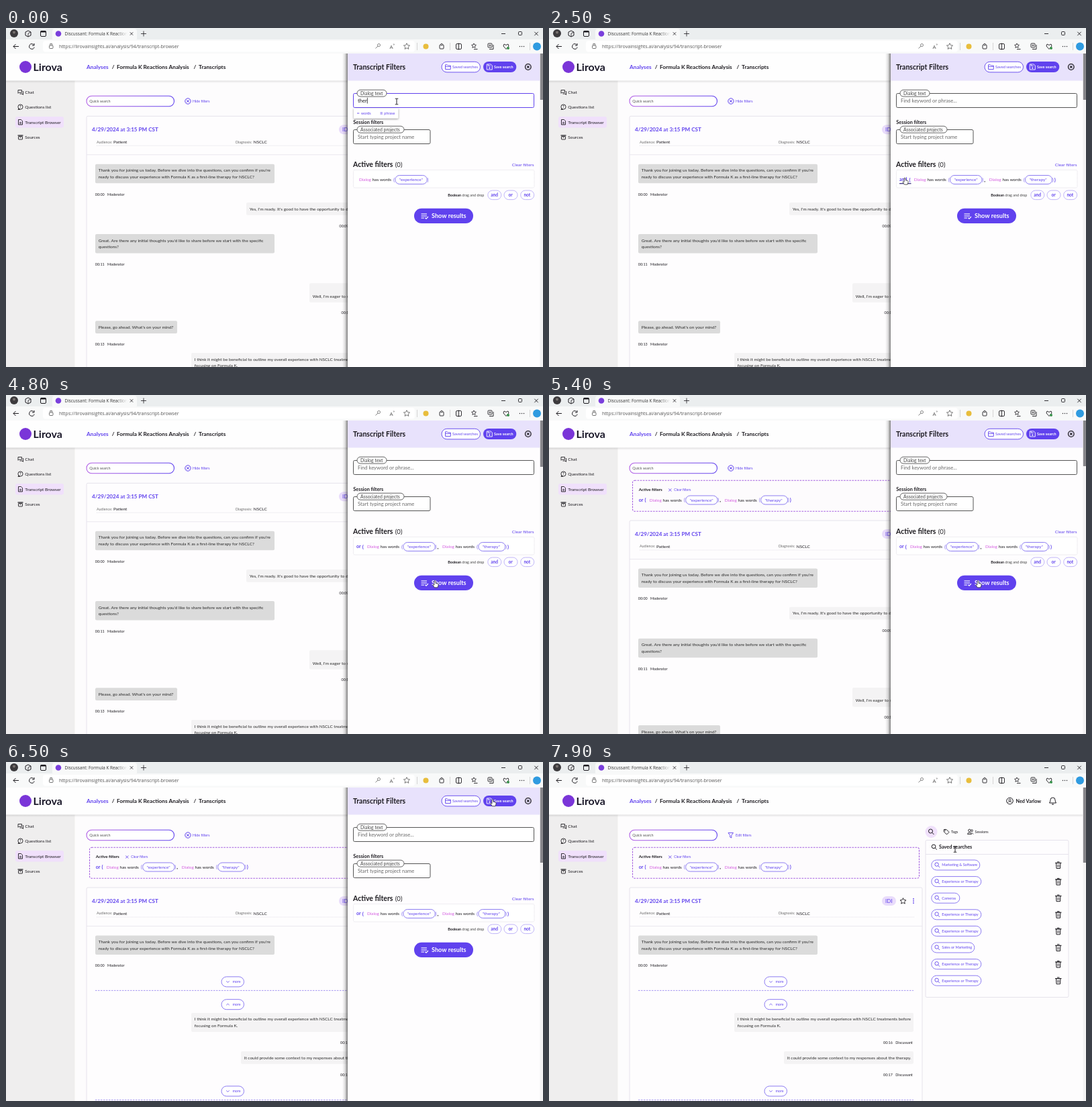
Animation of 800x505 px, one loop 8 s. Source, as an HTML page with a canvas:

```html
<!DOCTYPE html>
<html lang="en">
<head>
<meta charset="utf-8">
<title>Transcript filters</title>
<style>
html, body { margin: 0; width: 100%; height: 100%; overflow: hidden; background: #fdfcfd; }
canvas { display: block; width: 800px; height: 505px; }
</style>
</head>
<body>
<canvas id="stage"></canvas>
<script>
const W = 800, H = 505, LOOP = 8000;
const cv = document.getElementById('stage'), c = cv.getContext('2d');
const dpr = window.devicePixelRatio || 1;
cv.width = W * dpr;
cv.height = H * dpr;

const INK = '#1d1b20', VIO = '#6042ee', PINK = '#d45ee0', GREY = '#6a6a6a', LAV = '#e8e2fc', PALE = '#f0e0fb';
const UI = 'Lato, "Open Sans", sans-serif', SYS = '"Open Sans", "Noto Sans", sans-serif';

// ---------- helpers ----------
const clamp = v => Math.max(0, Math.min(1, v));
const span = (t, a, b) => clamp((t - a) / (b - a));
const ease = p => p * p * (3 - 2 * p);

// y is the vertical middle of the capitals
function txt(s, x, y, size, col = INK, weight = 400, font = UI) {
  c.font = `${weight} ${size}px ${font}`;
  c.fillStyle = col;
  c.fillText(s, x, y + size * 0.35);
}
function paint(fill, stroke, lw = 1) {
  if (fill) { c.fillStyle = fill; c.fill(); }
  if (stroke) { c.strokeStyle = stroke; c.lineWidth = lw; c.stroke(); }
}
function box(x, y, w, h, r, fill, stroke, lw) {
  c.beginPath();
  c.roundRect(x, y, w, h, r);
  paint(fill, stroke, lw);
}
function circ(x, y, r, fill, stroke, lw) {
  c.beginPath();
  c.arc(x, y, r, 0, 7);
  paint(fill, stroke, lw);
}
function poly(pts, fill, stroke, lw, close) {
  c.beginPath();
  for (let i = 0; i < pts.length; i += 2) c.lineTo(pts[i], pts[i + 1]);
  if (close) c.closePath();
  paint(fill, stroke, lw);
}
const line = (col, lw, ...pts) => poly(pts, null, col, lw);
function dashed(pattern, draw) {
  c.setLineDash(pattern);
  draw();
  c.setLineDash([]);
}
function cross(x, y, r, col, lw) {
  line(col, lw, x - r, y - r, x + r, y + r);
  line(col, lw, x + r, y - r, x - r, y + r);
}
function star(x, y, r, col, lw) {
  const pts = [];
  for (let i = 0; i < 10; i++) {
    const a = i * Math.PI / 5 - Math.PI / 2, q = i % 2 ? r * 0.48 : r;
    pts.push(x + q * Math.cos(a), y + q * Math.sin(a));
  }
  poly(pts, null, col, lw, true);
}
function lens(x, y, r, col, lw) {
  circ(x - r * 0.25, y - r * 0.25, r * 0.75, null, col, lw);
  line(col, lw, x + r * 0.3, y + r * 0.3, x + r, y + r);
}
function disk(x, y, col) {
  poly([x - 4, y - 4, x + 2, y - 4, x + 4, y - 2, x + 4, y + 4, x - 4, y + 4], null, col, 0.9, true);
  line(col, 0.9, x - 2, y - 4, x - 2, y - 1.5, x + 1.5, y - 1.5);
  circ(x, y + 1.6, 1.1, col);
}

// ---------- browser frame ----------
function browser() {
  c.fillStyle = '#ebeeef';
  c.fillRect(0, 0, W, 18);
  c.fillStyle = '#f8f9f9';
  c.fillRect(0, 17, W, 21);
  box(69, 1, 126, 19, 4, '#f8f9f9');
  circ(12, 8, 6, '#3c3a3d');
  circ(12, 6.5, 2, '#77716f');
  poly([29, 6, 33, 4, 37, 6, 37, 11, 33, 13, 29, 11], null, INK, 1, true);
  line(INK, 0.8, 33, 13, 33, 8, 37, 6);
  box(51.5, 4.5, 8, 8, 1.5, null, INK, 1);
  line(INK, 2, 51.5, 5.5, 59.5, 5.5);
  circ(78, 8.5, 4.3, '#7a3fdc');
  const fade = c.createLinearGradient(165, 0, 181, 0);
  fade.addColorStop(0, '#333');
  fade.addColorStop(1, 'rgba(60,60,60,0)');
  txt('Discussant: Formula K Reactions', 87.5, 8.7, 6.4, fade, 400, SYS);
  cross(187, 8.5, 2.2, INK, 0.8);
  line(INK, 0.8, 201, 8.5, 209, 8.5);
  line(INK, 0.8, 205, 4.5, 205, 12.5);
  line(INK, 0.9, 738, 8.5, 744, 8.5);
  box(763.5, 5.5, 5, 5, 1, null, INK, 0.9);
  cross(790, 8.5, 2.7, INK, 0.9);

  line(INK, 1, 19, 27.5, 11, 27.5);
  line(INK, 1, 14.5, 24, 11, 27.5, 14.5, 31);
  c.beginPath();
  c.arc(38.5, 27.5, 3.8, 0.3, 5.6);
  paint(null, INK, 1);
  line(INK, 1, 42, 23, 42, 26, 39, 26);
  box(55, 19, 554, 16.5, 4, '#fff');
  box(64.5, 26, 5.5, 4.5, 1, null, '#555', 0.8);
  line('#555', 0.8, 65.8, 26, 65.8, 23.5, 68.6, 23.5, 68.6, 26);
  txt('https://lirovainsights.ai/analysis/94/transcript-browser', 79, 27.3, 7.1, '#555', 400, SYS);

  circ(555.5, 25.5, 2, null, '#666', 0.8);
  line('#666', 0.8, 554, 27, 550.5, 30.5);
  txt('A', 571.5, 28, 8, '#555', 400, SYS);
  txt('»', 576.5, 24.5, 5, '#555', 400, SYS);
  star(597, 27.5, 4.8, '#555', 0.8);
  line('#ccc', 0.8, 612.5, 22, 612.5, 33);
  circ(625.5, 27.5, 4, '#e8bd3c');
  box(646, 25, 6, 6, 1, null, INK, 0.9);
  circ(649, 24.5, 1.3, '#f8f9f9', INK, 0.8);
  line('#ccc', 0.8, 661.5, 22, 661.5, 33);
  box(670.5, 23.5, 8, 8, 1.5, null, INK, 0.9);
  line(INK, 0.9, 674.5, 22.5, 674.5, 32.5);
  star(697, 26.5, 3.6, INK, 0.8);
  line(INK, 0.9, 697, 31.5, 702.5, 31.5);
  box(718, 23, 6, 6, 1, null, INK, 0.9);
  line(INK, 0.9, 720, 31.5, 726, 31.5, 726, 25);
  line(INK, 0.8, 721, 24.5, 721, 27.5);
  line(INK, 0.8, 719.5, 26, 722.5, 26);
  line(INK, 0.9, 745, 31.5, 741, 27, 742, 24, 745, 25.5, 748, 24, 749, 27, 745, 31.5);
  circ(748, 30, 2, '#39934c');
  for (const x of [765.5, 768.5, 771.5]) circ(x, 27.5, 0.7, INK);
  line('#ccc', 0.8, 780.5, 22, 780.5, 33);
  circ(791, 27.5, 6, '#2f9be0');
}

// ---------- page ----------
function sidebar() {
  c.fillStyle = '#efeeee';
  c.fillRect(0, 78, 102.5, H);
  box(14, 132, 72, 16.5, 3, PALE);
  txt('Chat', 28.3, 95.5, 6.5);
  txt('Questions list', 28.3, 118, 6.5);
  txt('Transcript Browser', 28.3, 140.5, 6.5);
  txt('Sources', 28.3, 162.8, 6.5);
  line(INK, 0.9, 18, 97, 18, 92.5, 23.5, 92.5, 23.5, 96, 19.5, 96, 18, 97.5);
  line(INK, 0.9, 20.5, 98, 24, 98, 25.5, 99.5, 25.5, 94);
  circ(21.5, 117.5, 3.6, null, INK, 0.9);
  line(INK, 0.9, 19, 120, 18, 121.5, 21, 121.2);
  txt('?', 20.2, 117.5, 5, INK, 700);
  poly([18.5, 136.5, 22.5, 136.5, 24.5, 138.5, 24.5, 144, 18.5, 144], null, INK, 0.9, true);
  line(INK, 0.8, 20, 140.5, 23, 140.5);
  line(INK, 0.8, 20, 142.3, 23, 142.3);
  box(18.5, 161.5, 6, 4.5, 0.5, null, INK, 0.9);
  line(INK, 1.2, 17.5, 160, 25.5, 160);
  line(INK, 0.8, 20.3, 163, 22.7, 163);
}

function header() {
  const g = c.createLinearGradient(0, 78, 0, 82);
  g.addColorStop(0, 'rgba(0,0,0,.13)');
  g.addColorStop(1, 'rgba(0,0,0,0)');
  c.fillStyle = g;
  c.fillRect(0, 78, 795, 4);
  c.fillStyle = '#fefefe';
  c.fillRect(0, 38, 795, 40.5);
  circ(29, 58, 9, '#7a35d8');
  txt('Lirova', 40.5, 58, 16, '#1c1a2b', 700);
  txt('Analyses', 120, 58, 8.3, VIO, 700);
  txt('/', 157.7, 58, 8.3, INK, 700);
  txt('Formula K Reactions Analysis', 165, 58, 8.25, INK, 700);
  txt('/', 279.5, 58, 8.3, INK, 700);
  txt('Transcripts', 287, 58, 8.3, INK, 700);
  circ(686.5, 58, 4.8, null, INK, 1);
  circ(686.5, 56.7, 1.6, null, INK, 0.9);
  c.beginPath();
  c.arc(686.5, 62, 3.2, 3.6, 5.8);
  paint(null, INK, 0.9);
  txt('Ned Varlow', 695.5, 58, 7.2, INK, 700);
  c.beginPath();
  c.moveTo(745.5, 61);
  c.quadraticCurveTo(747, 59, 747, 56.5);
  c.arc(750.5, 56.5, 3.5, Math.PI, 0);
  c.quadraticCurveTo(754, 59, 755.5, 61);
  c.closePath();
  paint(null, INK, 1);
  line(INK, 1.1, 749, 63, 752, 63);
}

function term(d, y, word, w) {
  txt('Dialog', d, y, 6.4, PINK);
  txt('has words', d + 19.8, y, 6.4);
  txt('(', d + 51, y, 8, '#8d7cf0');
  box(d + 53.8, y - 6.5, w, 13, 6.5, '#fff', '#8270f0', 0.9);
  txt(`"${word}"`, d + 59.7, y, 6.4, VIO);
  txt(')', d + 54 + w, y, 8, '#8d7cf0');
}
function expr(op, x, y) {
  if (!op) return term(x + 4, y, 'experience', 47.5);
  const d = x + (op === 'and' ? 21.7 : 16);
  txt(op, x, y, 7, VIO, 700);
  txt('(', d - 7.3, y, 7.5, VIO, 700);
  term(d, y, 'experience', 47.5);
  txt(',', d + 104.5, y, 7.5, INK, 700);
  term(d + 112, y, 'therapy', 40);
  txt(')', d + 209, y, 7.5, VIO, 700);
}

function message(x, y, w, dark, lines) {
  box(x, y, w, 9 + 9.7 * lines.length, 2, dark ? '#dbdbdb' : '#f4f3f4');
  lines.forEach((s, i) => txt(s, x + 4.7, y + 9.3 + i * 9.8, 6.45, '#2c2c2c'));
}
function meta(time, who, x, y) {
  txt(time, x, y, 5.4);
  txt(who, x + 18.3, y, 5.4);
}
function more(y, up) {
  box(321, y - 7.5, 33.5, 15, 7.5, '#fff', '#7f6cf0', 0.9);
  const k = up ? -1 : 1;
  line(VIO, 0.8, 328.3, y - k, 330.5, y + k, 332.7, y - k);
  txt('more', 337.5, y, 5.3, VIO);
}
function gap(y) {
  more(y);
  dashed([2.5, 1.5], () => line('#9b8df0', 0.9, 133, y + 13, 543, y + 13));
  more(y + 33.8, true);
}

const OPENER = ["Thank you for joining us today. Before we dive into the questions, can you confirm if you're",
  'ready to discuss your experience with Formula K as a first-line therapy for NSCLC?'];
const OUTLINE = ['I think it might be beneficial to outline my overall experience with NSCLC treatments before',
  'focusing on Formula K.'];

function transcript(top, found, grow) {
  box(120, top, 436, 420, 2, '#fefdfe', '#e6e3ec', 1);
  txt('4/29/2024 at 3:15 PM CST', 128, top + 20, 8.1, VIO, 700);
  box(496, top + 13, 21, 14, 7, '#e9dcfb');
  txt('IDI', 501, top + 20, 8.2, VIO);
  star(527.5, top + 20.3, 4.7, INK, 0.9);
  for (const dy of [17, 20, 23]) circ(543, top + dy, 0.9, VIO);
  txt('Audience:', 135, top + 38.5, 5.3, GREY);
  txt('Patient', 160, top + 38.5, 6.5);
  txt('Diagnosis:', 342, top + 38.5, 5.4, GREY);
  txt('NSCLC', 368.5, top + 38.5, 6.5);
  dashed([1, 1], () => line('#dedbe3', 0.8, 135, top + 44, 545, top + 44));
  line('#e9e6ee', 0.9, 120, top + 57.5, 556, top + 57.5);

  message(133, top + 71.5, 267, true, OPENER);
  meta('00:00', 'Moderator', 132.8, top + 116.5);
  if (!found) {
    message(358, top + 128.7, 185, false, ["Yes, I'm ready. It's good to have the opportunity to discuss it."]);
    meta('00:09', 'Discussant', 496.5, top + 164);
    message(133, top + 175.8, 267, true, ["Great. Are there any initial thoughts you'd like to share before we start with the specific", 'questions?']);
    meta('00:11', 'Moderator', 132.8, top + 221);
    message(452, top + 249, 91, false, ['', "Well, I'm eager to share."]);
    meta('00:12', 'Discussant', 499.5, top + 293);
    message(133, top + 305, 122, true, ["Please, go ahead. What's on your mind?"]);
    meta('00:13', 'Moderator', 132.8, top + 340);
    message(276, top + 352.7, 267, false, OUTLINE);
    return;
  }
  const k = grow * 8.4;
  gap(top + 132 + k);
  message(276, top + 178.3 + k, 267, false, OUTLINE);
  meta('00:16', 'Discussant', 498, top + 223 + k);
  message(350, top + 227.2 + 2 * k, 193, false, ['It could provide some context to my responses about the therapy.']);
  meta('00:17', 'Discussant', 498, top + 262.2 + 2 * k);
  gap(top + 279 + 2.9 * k);
}

const SAVED = [['Marketing & Software', 72], ['Experience or Therapy', 74], ['Cameras', 42],
  ['Experience or Therapy', 74], ['Experience or Therapy', 74], ['Sales or Marketing', 64],
  ['Experience or Therapy', 74], ['Experience or Therapy', 74]];

function savedList() {
  circ(569.5, 104, 9, PALE);
  lens(569.5, 104, 4, INK, 1);
  poly([588.5, 100.5, 592, 100.5, 596, 104.5, 592.5, 108, 588.5, 104], null, INK, 1, true);
  circ(590.3, 102.3, 0.7, INK);
  txt('Tags', 599, 104, 5.4);
  circ(626.5, 102, 1.8, null, INK, 0.9);
  circ(630, 102.2, 1.4, null, INK, 0.8);
  line(INK, 0.9, 623.5, 107.5, 624.5, 105.3, 628.5, 105.3, 629.5, 107.5, 623.5, 107.5);
  line(INK, 0.9, 630, 105.3, 632, 107.5);
  txt('Sessions', 634.5, 104, 5.4);
  box(561, 116.5, 213, 234, 2, '#fefdfe', '#e6e3ec', 1);
  lens(574, 126.8, 3.8, INK, 1);
  txt('Saved searches', 581, 126.8, 7.3, INK, 700);
  line('#e6e3ec', 1, 561, 137.5, 774, 137.5);
  SAVED.forEach(([name, w], i) => {
    const y = 153.5 + i * 24.6;
    box(569.8, y - 7.5, w, 15, 7.5, '#fff', '#7f6cf0', 0.9);
    lens(578.5, y, 3.6, VIO, 0.9);
    txt(name, 585.3, y, 5.5, VIO);
    poly([755.5, y - 3, 762, y - 3, 761.5, y + 5, 756, y + 5], null, INK, 1, true);
    line(INK, 1, 754, y - 3.2, 763.5, y - 3.2);
    line(INK, 1, 757, y - 4.7, 760.5, y - 4.7);
    line(INK, 0.8, 757.8, y - 1, 757.8, y + 3.2);
    line(INK, 0.8, 759.8, y - 1, 759.8, y + 3.2);
  });
}

function main(s) {
  const g = c.createLinearGradient(120, 101, 250, 117);
  g.addColorStop(0, '#b25fe6');
  g.addColorStop(0.5, '#8a4fe6');
  g.addColorStop(1, VIO);
  box(120, 101.2, 130.5, 15.6, 7.8, '#fff', g, 1.1);
  txt('Quick search', 124.3, 109.3, 5.5, '#555');
  if (s.closing) {
    poly([267, 105.5, 274.5, 105.5, 271.8, 109.3, 271.8, 113, 269.7, 112, 269.7, 109.3], null, VIO, 0.9, true);
    txt('Edit filters', 278, 109, 5.3, VIO);
  } else {
    circ(271, 109, 4.2, null, VIO, 1);
    cross(271, 109, 1.8, VIO, 1);
    txt('Hide filters', 278, 109, 5.3, VIO);
  }
  if (s.applied) {
    dashed([2.6, 1.5], () => box(124.5, 127.3, 427, 46, 3, '#fdfbfd', '#a45fe0', 1.1));
    txt('Active filters', 133.8, 141.3, 6.2, INK, 700);
    cross(180.3, 141.5, 2, VIO, 0.9);
    txt('Clear filters', 186.3, 141.5, 5, VIO);
    expr('or', 133.8, 156.5);
  }
  transcript(s.applied ? 187 : 131.3, s.found, s.grow);
}

// ---------- filter drawer ----------
function drawer(s) {
  const g = c.createLinearGradient(501, 0, 509, 0);
  g.addColorStop(0, 'rgba(30,30,30,0)');
  g.addColorStop(0.5, 'rgba(30,30,30,.14)');
  g.addColorStop(1, 'rgba(30,30,30,.56)');
  c.fillStyle = g;
  c.fillRect(501, 38, 8, H);
  c.fillStyle = '#fefdfe';
  c.fillRect(509, 38, 286.5, H);
  c.fillStyle = LAV;
  c.fillRect(509, 38, 286.5, 40.5);
  txt('Transcript Filters', 517, 58.3, 10.5, INK, 700);
  box(649, 50.3, 57.5, 15.6, 7.8, '#fff', VIO, 0.9);
  poly([654.5, 54.8, 657.3, 54.8, 658.5, 56, 662.3, 56, 662.3, 61.5, 654.5, 61.5], null, VIO, 0.9, true);
  line(VIO, 0.8, 654.5, 57.6, 662.3, 57.6);
  txt('Saved searches', 665, 58.2, 5.7, VIO);
  box(711, 50, 49.3, 16, 8, VIO);
  disk(720.3, 58, '#fff');
  txt('Save search', 727, 58.2, 5.5, '#fff', 700);
  circ(777.8, 58, 4.3, null, INK, 1.3);
  cross(777.8, 58, 1.7, INK, 1.2);

  box(517.5, 97.5, 269, 21, 2, '#fff', s.typed ? VIO : '#555', 1);
  box(523, 92.2, 44, 10, 5, '#fff', '#555', 0.9);
  txt('Dialog text', 528, 97.3, 7, '#444');
  if (s.typed) {
    txt(s.typed, 524, 108.3, 7.6);
    const end = 524.6 + c.measureText(s.typed).width;
    line(INK, 0.8, end, 103.8, end, 112.5);
  } else txt('Find keyword or phrase...', 524, 108.3, 7.6, GREY);

  txt('Session filters', 517.3, 140, 7.3, INK, 700);
  box(517.5, 151.5, 114.5, 21, 2, '#fff', '#555', 1);
  box(523, 146.2, 70, 10, 5, '#fff', '#555', 0.9);
  txt('Associated projects', 528, 151.3, 6.9, '#444');
  txt('Start typing project name', 524, 162.5, 7.6, GREY);

  txt('Active filters', 517, 203.5, 10.5, INK, 700);
  txt('(0)', 579.8, 203.5, 9.6);
  txt('Clear filters', 753.8, 203.5, 6.5, VIO);
  dashed([1, 1], () => box(517.5, 211.5, 269.5, 26.5, 2, '#fff', '#dddae2', 0.9));
  expr(s.op, 522, 226);
  if (s.hover) line('#2d2478', 1.2, 522, 231.7, 539.5, 231.7);

  txt('Boolean', 658.3, 248.7, 5.4, INK, 700);
  txt('drag and drop', 679.5, 248.7, 5.4, '#444');
  [['and', 717.8, 4.4], ['or', 742, 6.5], ['not', 766.7, 4.7]].forEach(([w, x, dx]) => {
    box(x, 242, 20, 13.6, 6.8, '#fff', '#b9adf8', 0.9);
    txt(w, x + dx, 248.7, 6.6, VIO, 700);
  });
  box(608, 268.7, 88, 22.3, 11.1, VIO);
  line('#fff', 1.1, 618.5, 277, 627, 277);
  line('#fff', 1.1, 618.5, 280, 627, 280);
  line('#fff', 1.1, 618.5, 283, 623, 283);
  line('#fff', 1.1, 624.3, 282.5, 626, 284.2, 629, 281);
  txt('Show results', 634, 280, 9.1, '#fff', 700);

  if (s.typed) {
    c.save();
    c.shadowColor = 'rgba(0,0,0,.4)';
    c.shadowBlur = 3 * dpr;
    c.shadowOffsetY = dpr;
    box(518, 119.5, 66.5, 15.3, 1, '#fff');
    c.restore();
    line(VIO, 0.9, 523, 127, 526.3, 127);
    txt('words', 529, 127, 5.5, VIO);
    line(VIO, 0.8, 557.5, 126, 561, 126);
    line(VIO, 0.8, 557.5, 128, 561, 128);
    txt('phrase', 563.3, 127, 5.5, VIO);
  }
}

function scrollbar(end) {
  c.fillStyle = '#f3f2f3';
  c.fillRect(795.5, 38, 4.5, H);
  box(795.8, 38, 4.2, end - 38, 0, '#87868a');
}

// ---------- pointer ----------
const PATH = [[0, 582, 109.5], [500, 582, 109.5], [950, 540, 125], [1900, 540, 125], [2600, 529.5, 228.5],
  [3900, 529.5, 228.5], [4400, 639, 276.5], [5950, 639, 276.5], [6400, 725, 55.5], [6700, 725, 55.5],
  [7100, 778, 57], [7400, 778, 57], [7800, 605, 130], [LOOP, 605, 130]];
const SHAPES = [[0, 'beam'], [700, 'arrow'], [850, 'hand'], [1250, 'arrow'], [2450, 'hand'], [4000, 'arrow'],
  [4300, 'hand'], [6050, 'arrow'], [6300, 'hand'], [6850, 'arrow'], [7000, 'hand'], [7450, 'arrow'], [7700, 'beam']];

function pointer(t) {
  const i = PATH.findIndex(p => p[0] > t), [t0, x0, y0] = PATH[i - 1], [t1, x1, y1] = PATH[i];
  const p = ease(span(t, t0, t1));
  const kind = SHAPES.filter(k => k[0] <= t).pop()[1];
  c.save();
  c.translate(x0 + (x1 - x0) * p, y0 + (y1 - y0) * p);
  if (kind === 'beam') {
    line(INK, 1, 0, -4, 0, 4);
    line(INK, 0.9, -2.3, -4.3, 2.3, -4.3);
    line(INK, 0.9, -2.3, 4.3, 2.3, 4.3);
  } else if (kind === 'arrow') {
    poly([0, 0, 0, 8, 1.9, 6.4, 3.2, 9.2, 4.5, 8.6, 3.3, 5.8, 5.8, 5.6], '#fff', '#555', 0.8, true);
  } else {
    c.beginPath();
    c.moveTo(-1, 1);
    c.quadraticCurveTo(0, -0.8, 1, 1);
    c.lineTo(1, 3.8);
    c.lineTo(4.3, 4.6);
    c.quadraticCurveTo(5.4, 5.2, 5, 7);
    c.lineTo(4, 10.3);
    c.lineTo(-0.6, 10.3);
    c.lineTo(-3.2, 6.6);
    c.quadraticCurveTo(-2.8, 5.4, -1, 6.6);
    c.closePath();
    paint('#fff', '#333', 0.8);
  }
  c.restore();
}

// ---------- timeline ----------
function draw(t) {
  const s = {
    typed: t < 1200 ? 'therapy'.slice(0, 4 + Math.floor(t / 120)) : '',
    op: t < 1200 ? '' : t < 3700 ? 'and' : 'or',
    hover: t >= 2450 && t < 4000,
    applied: t >= 5000,
    found: t >= 5700,
    grow: span(t, 5900, 6100),
    closing: t >= 7300
  };
  c.setTransform(dpr, 0, 0, dpr, 0, 0);
  c.fillStyle = '#fdfcfd';
  c.fillRect(0, 0, W, H);
  main(s);
  savedList();
  sidebar();
  header();
  const out = ease(span(t, 7300, 7500));
  if (out < 1) {
    c.save();
    c.translate(out * 296, 0);
    drawer(s);
    c.restore();
  }
  scrollbar(!s.applied ? 107 : !s.found ? 106 : 159 - 9 * s.grow);
  browser();
  pointer(t);
}

const start = performance.now();
function tick(now) {
  draw(Math.max(0, now - start) % LOOP);
  requestAnimationFrame(tick);
}
draw(0);
requestAnimationFrame(tick);
</script>
</body>
</html>
```
